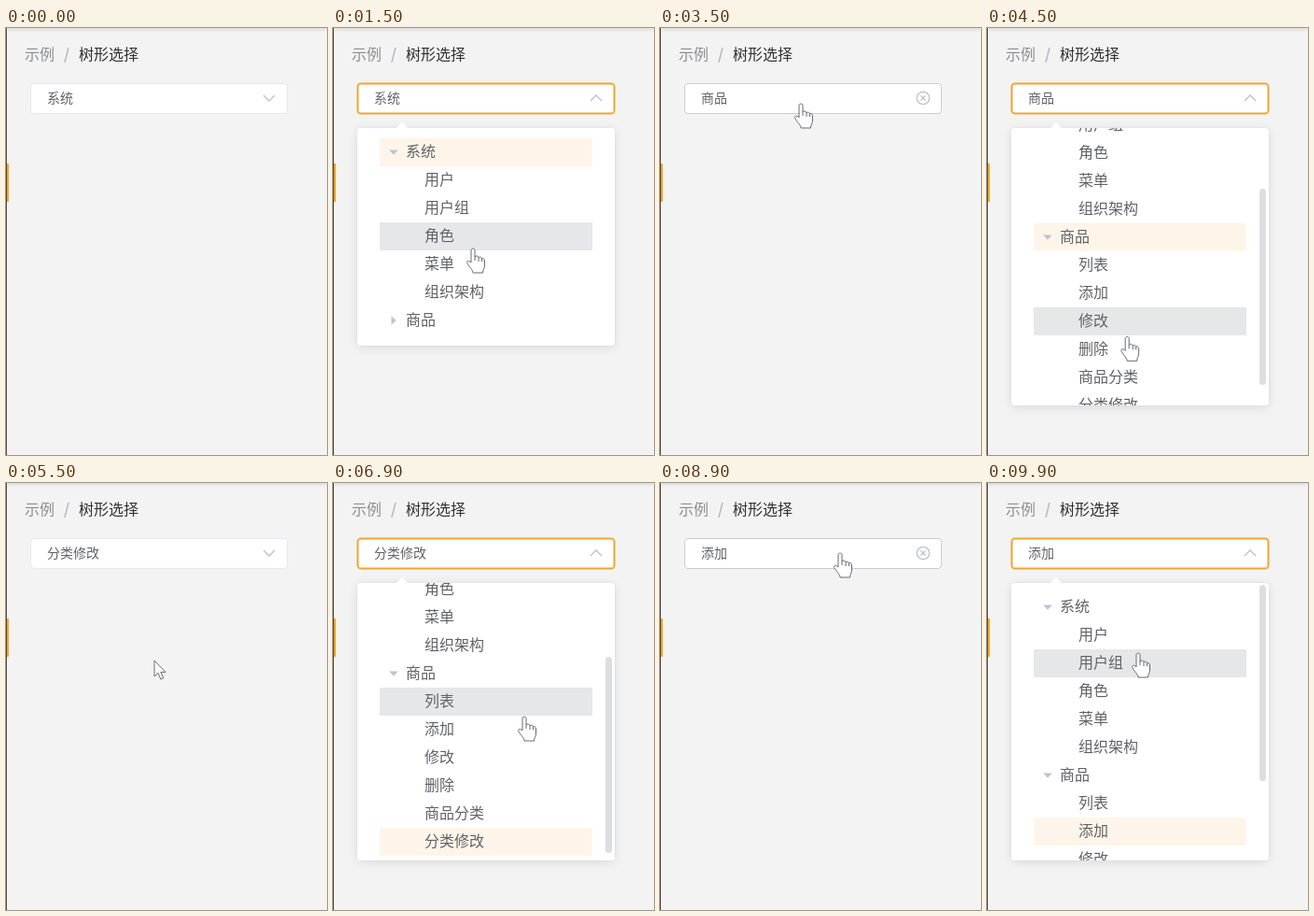
Recreate the animation shown at these times as an HTML page. Size 344 by 457 pixels, loop 10000 ms.

```html
<!DOCTYPE html>
<html lang="zh-CN">
<head>
<meta charset="utf-8">
<title>树形选择</title>
<style>
  html, body { margin: 0; width: 100%; height: 100%; overflow: hidden; }
  body { position: relative; background: #f3f3f3; color: #606266;
    font: 16px/27px "Noto Sans CJK SC", "Noto Sans CJK", sans-serif; }
  body > * { position: absolute; box-sizing: border-box; white-space: nowrap; }
  .head { left: 0; top: -4px; width: 100%; height: 4px; box-shadow: 0 1px 4px rgba(0, 0, 0, .16); }
  .edge { left: 0; top: 0; width: 2px; height: 100%; background: #fafafa; border-left: 1px solid #4c4c4c; }
  .mark { left: 1px; top: 145px; width: 2px; height: 41px; background: #f5a623; }
  .crumb { top: 14px; }
  #select { left: 26px; top: 59px; width: 276px; height: 33px; padding-left: 17px;
    border: 1px solid #e4e7ed; border-radius: 4px; background: #fff; font-size: 14px; line-height: 29px; }
  #select.hover { border-color: #c8ccd2; }
  #select.open { border-color: #eea530; box-shadow: 0 0 0 .5px #eea530, inset 0 0 0 .5px #eea530; }
  #select svg { position: absolute; left: 247px; top: 7px; overflow: visible; }
  #panel { left: 26px; top: 107px; width: 276px; transform-origin: 50% 0; }
  #notch { position: absolute; left: 42px; top: -6px; width: 0;
    border: solid transparent; border-width: 0 6px 6px; border-bottom-color: #fff; }
  #view { position: relative; height: 100%; overflow: hidden; background: #fff; border-radius: 4px; }
  .card { position: absolute; inset: 0; border-radius: 4px; box-shadow: 0 2px 12px rgba(0, 0, 0, .1), 0 0 0 1px #ebedf0; }
  #tree { position: absolute; left: 24px; top: 11px; width: 228px; }
  .row { position: relative; height: 30px; padding-left: 28px; box-sizing: border-box; }
  .kids { overflow: hidden; }
  .kids .row { padding-left: 48px; }
  .row.on { background: #fef5ea; }
  .row.hover { background: #e6e7e9; }
  .row svg { position: absolute; left: 9px; top: 9px; overflow: visible; }
  #thumb { position: absolute; right: 3px; top: 2px; width: 7px; height: 210px; border-radius: 4px; background: #dddee0; }
  #cursor { left: 0; top: -1px; overflow: visible; }
</style>
</head>
<body>
<div class="head"></div>
<div class="edge"></div>
<div class="mark"></div>
<div class="crumb" style="left:20px;color:#8c8e92">示例</div>
<div class="crumb" style="left:62px;color:#b4b8c0;font-weight:bold">/</div>
<div class="crumb" style="left:78px;color:#303133">树形选择</div>

<div id="select">
  <span id="value"></span>
  <svg width="16" height="16" viewBox="-8 -8 16 16" fill="none" stroke="#bcc0c8" stroke-width="1.3">
    <path id="chevron" d="M-6 -3L0 3L6 -3"/>
    <g id="clear"><circle r="6.7"/><path d="M-2.5 -2.5L2.5 2.5M2.5 -2.5L-2.5 2.5"/></g>
  </svg>
</div>

<div id="panel">
  <div class="card"></div>
  <div id="notch"></div>
  <div id="view"><div id="tree"></div><div id="thumb"></div></div>
</div>

<svg id="cursor" width="1" height="1" fill="#fff" stroke="#666a70" stroke-linejoin="round">
  <g id="hand">
    <path d="M-2 15V2C-2 -.5 2 -.5 2 2V9C2 7.5 6 7.5 6 10C6 8.5 9.5 8.8 9.5 11C9.5 10 12.5 10.3 12.5 13V18C12.5 22 10.5 22 10.5 26H0C0 23 -3 21 -6 16C-7.5 13.5 -4.5 12 -2 15Z"/>
    <path d="M2 9V13M6 10V14M9.5 11V14" fill="none"/>
  </g>
  <path id="arrow" d="M0 0V17L4 13.4L6.8 20L9.6 18.8L6.8 12.4H12Z"/>
</svg>

<script>
const LOOP = 10000, STEP = 100, PRESS = 200, FADE = 300;
const ROW = 30, MAX_HEIGHT = 297, BOTTOM = 109;
const TREE = {
  '系统': ['用户', '用户组', '角色', '菜单', '组织架构'],
  '商品': ['列表', '添加', '修改', '删除', '商品分类', '分类修改'],
};
// Where the pointer arrives and what it does there; a press acts after a short rest.
const STOPS = [
  { t: 0, x: 170, y: 480 },
  { t: 500, x: 150, y: 80, open: true },
  { t: 900, x: 66, y: 137, expand: '系统' },
  { t: 1500, x: 150, y: 237 },
  { t: 2000, x: 66, y: 317, expand: '商品' },
  { t: 2900, x: 96, y: 318, pick: '商品' },
  { t: 3500, x: 151, y: 82, open: true },
  { t: 4800, x: 150, y: 387, pick: '分类修改', scroll: BOTTOM },
  { t: 5500, x: 159, y: 191 },
  { t: 5800, x: 195, y: 80, open: true },
  { t: 6900, x: 205, y: 251 },
  { t: 7300, x: 205, y: 267, pick: '添加' },
  { t: 8900, x: 193, y: 76, open: true },
  { t: 9900, x: 162, y: 183, scroll: 0 },
];

const $ = id => document.getElementById(id);
const clamp = v => Math.min(1, Math.max(0, v));
const ease = v => v * v * (3 - 2 * v);
const mix = (a, b, p) => a + (b - a) * p;
const after = (t, start) => ease(clamp((t - start) / FADE));

let carried = 0;
for (const s of STOPS) {
  carried = s.scroll ??= carried;
  s.acts = s.open || s.expand || s.pick;
  s.done = s.t + (s.acts ? PRESS : 0);
}

function pointer(t) {
  const i = STOPS.findLastIndex(s => s.t <= t);
  const a = STOPS[i], b = STOPS[i + 1] || a;
  const p = ease(clamp((t - a.done) / (b.t - a.done || 1)));
  return { x: mix(a.x, b.x, p), y: mix(a.y, b.y, p), scroll: mix(a.scroll, b.scroll, p) };
}

const rows = [];
function addRow(parent, name) {
  const el = document.createElement('div');
  el.className = 'row';
  el.textContent = name;
  parent.append(el);
  rows.push({ el, name });
  return el;
}

const groups = Object.entries(TREE).map(([name, kids]) => {
  const row = addRow($('tree'), name);
  row.insertAdjacentHTML('beforeend',
    '<svg width="12" height="12" viewBox="-6 -6 12 12"><path d="M-2.5 -4.8L2.8 0L-2.5 4.8Z" fill="#c0c4cc"/></svg>');
  const box = document.createElement('div');
  box.className = 'kids';
  $('tree').append(box);
  kids.forEach(kid => addRow(box, kid));
  const start = STOPS.find(s => s.expand === name).done;
  return { box, start, full: kids.length * ROW, caret: row.querySelector('path') };
});

function draw(t) {
  const { x, y, scroll } = pointer(t);
  const past = STOPS.filter(s => s.done <= t);
  const value = past.findLast(s => s.pick)?.pick || '系统';
  const open = Boolean(past.findLast(s => s.open || s.pick)?.open);
  const shown = past.reduce((sum, s) =>
    sum + (s.open ? 1 : s.pick ? -1 : 0) * after(t, s.done), 0);

  let content = 23;
  for (const g of groups) {
    const p = after(t, g.start);
    g.box.style.height = g.full * p + 'px';
    g.caret.setAttribute('transform', `rotate(${90 * p})`);
    content += ROW + g.full * p;
  }
  const height = Math.min(MAX_HEIGHT, content);
  const panel = $('panel').style;
  panel.height = height + 'px';
  panel.opacity = shown;
  panel.visibility = shown > 0 ? 'visible' : 'hidden';
  panel.transform = `scaleY(${shown})`;
  $('tree').style.transform = `translateY(${-scroll}px)`;
  $('thumb').style.transform = `translateY(${scroll * 77 / BOTTOM}px)`;
  $('thumb').style.display = content > MAX_HEIGHT ? 'block' : 'none';

  const inside = x > 26 && x < 302;
  const overSelect = inside && y >= 60 && y < 92;
  const overPanel = open && inside && y >= 107 && y < 107 + height;
  const under = overPanel && x > 50 && x < 278 ? rows.findLast(({ el }) => {
    const r = el.getBoundingClientRect();
    return y - 4 >= r.top && y - 4 < r.bottom;
  }) : null;
  for (const row of rows) {
    row.el.classList.toggle('on', row.name === value);
    row.el.classList.toggle('hover', row === under);
  }

  $('value').textContent = value;
  $('select').classList.toggle('hover', overSelect);
  $('select').classList.toggle('open', open);
  $('clear').style.display = overSelect ? '' : 'none';
  $('chevron').style.display = overSelect ? 'none' : '';
  $('chevron').setAttribute('transform', `rotate(${180 * shown})`);

  const hand = overSelect || overPanel;
  $('hand').style.display = hand ? '' : 'none';
  $('arrow').style.display = hand ? 'none' : '';
  $('cursor').style.transform = `translate(${x}px, ${y}px)`;
}

const began = performance.now();
function tick() {
  const t = (performance.now() - began) % LOOP;
  draw(Math.floor(t / STEP) * STEP);
  requestAnimationFrame(tick);
}
tick();
</script>
</body>
</html>
```
